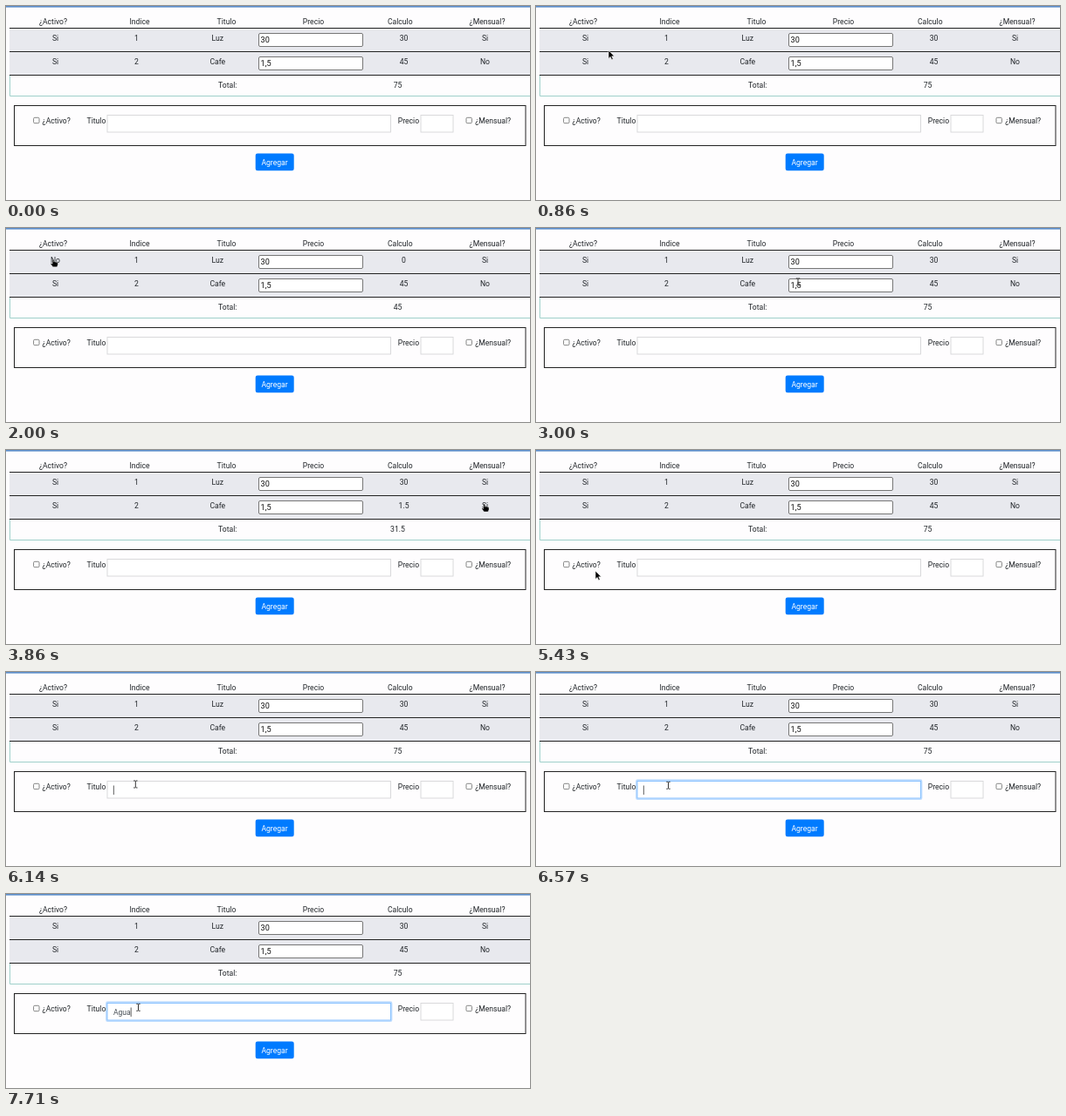
Write an HTML page that moves like this. It is 600 px wide and 223 px high and loops after 8000 ms.

```html
<!DOCTYPE html>
<html lang="es">
<head>
<meta charset="utf-8">
<title>Gastos</title>
<style>
  html, body { margin: 0; width: 100%; height: 100%; overflow: hidden; background: #fefdfe; }
  svg { display: block; width: 100%; height: 100%; }
  text { font: 8.6px Roboto, sans-serif; fill: #212529; }
  .mid { text-anchor: middle; }
  .field { font-size: 9.1px; fill: #111; }
</style>
</head>
<body>
<svg id="stage" viewBox="0 0 600 223">
  <rect width="600" height="1.6" fill="#5b8dcb"/>
  <rect x="4" y="25" width="596" height="55" fill="#e8e9ee"/>
  <path d="M4 25.5H600M4 52.5H600M4 79.5H600" stroke="#222" fill="none"/>
  <path d="M600 103.5H4.5V80" stroke="#9fd0ca" fill="none"/>
  <g fill="#fff" stroke="#767676">
    <rect x="289.5" y="31.5" width="119" height="15" rx="1.5"/>
    <rect x="289.5" y="58.5" width="119" height="15" rx="1.5"/>
  </g>
  <rect x="9.5" y="114.5" width="585.5" height="46" fill="none" stroke="#222"/>
  <g fill="#fff" stroke="#767676" stroke-width=".9">
    <rect x="31.6" y="128.3" width="6.4" height="6.4" rx="1.2"/>
    <rect x="527" y="128.3" width="6.4" height="6.4" rx="1.2"/>
  </g>
  <rect id="glow" x="115" y="124.2" width="326.5" height="22" rx="1.5" fill="none" stroke="#007bff" stroke-opacity=".25" stroke-width="1.8"/>
  <rect id="title" x="116" y="125.5" width="324.5" height="19.5" fill="#fff" stroke="#d6d6d8" stroke-width=".9"/>
  <rect x="475" y="125.5" width="37" height="19.5" fill="#fff" stroke="#d6d6d8" stroke-width=".9"/>
  <rect x="285.7" y="169.5" width="44" height="19.7" rx="2.3" fill="#007bff"/>
  <g id="labels"></g>
  <text id="typed" x="122.9" y="138.6" style="fill:#495057"></text>
  <path id="caret" d="M0 130.5V141" stroke="#333" stroke-width=".8"/>
  <g id="cursor">
    <path id="arrow" d="M0 0V9.4L2.2 7.4L3.7 10.8L5.3 10.1L3.8 6.8H6.8Z" fill="#000" stroke="#fff" stroke-width=".6"/>
    <path id="hand" d="M-.9 .4Q0 -.6 .8 .4V3Q1.7 2.3 2.4 3.1Q3.3 2.6 3.9 3.4Q5.3 3 5.4 4.6V6.3L4.4 8.7H-.2L-2.8 5.4Q-2.6 4.2 -1.6 4.7L-.9 5.3Z" fill="#000" stroke="#fff" stroke-width=".4"/>
    <path id="beam" d="M-2.2 -4H-.6L0 -3.5L.6 -4H2.2M0 -3.5V3.5M-2.2 4H-.6L0 3.5L.6 4H2.2" fill="none" stroke="#333" stroke-width="1"/>
  </g>
</svg>
<script>
const $ = id => document.getElementById(id);
const LOOP = 8000, RATE = 7 / 1000;

function label(str, x, y, cls = 'mid') {
  const el = document.createElementNS('http://www.w3.org/2000/svg', 'text');
  el.textContent = str;
  el.setAttribute('x', x);
  el.setAttribute('y', y);
  el.setAttribute('class', cls);
  return $('labels').appendChild(el);
}

const row = (words, xs, y) => words.map((w, i) => label(w, xs[i], y));
const columns = [56.5, 149.5, 242.3, 455.5, 548.5];
row(['¿Activo?', 'Indice', 'Titulo', 'Precio', 'Calculo', '¿Mensual?'],
    [54, 153, 252.5, 352, 451.3, 551], 21.3);
const light = row(['Si', '1', 'Luz', '30', 'Si'], columns, 39.8);
const coffee = row(['Si', '2', 'Cafe', '45', 'No'], columns, 67);
const [, total] = row(['Total:', '75'], [253.7, 448.5], 94);
label('30', 291.6, 42, 'field');
label('1,5', 291.6, 69, 'field');
label('¿Activo?', 41.6, 134.6, '');
label('Titulo', 92.6, 134.6, '');
label('Precio', 448.8, 134.6, '');
label('¿Mensual?', 537.2, 134.6, '');
label('Agregar', 307.5, 182.5).style.fill = '#fff';

// Pointer path: step, shape, x, y
const path = [
  [1, 'arrow', 323, 176], [3, 'arrow', 205, 115], [5, 'arrow', 105, 62],
  [6, 'arrow', 83, 51], [7, 'arrow', 62, 41], [8, 'hand', 54, 36],
  [18, 'hand', 54, 36], [19, 'arrow', 90, 41], [21, 'beam', 300, 62],
  [22, 'arrow', 420, 66], [23, 'arrow', 505, 66], [24, 'hand', 547.6, 62.2],
  [34, 'hand', 547.6, 62.2], [35, 'arrow', 470, 78], [36, 'arrow', 280, 112],
  [37, 'arrow', 120, 138], [38, 'arrow', 68, 139], [39, 'arrow', 52, 138],
  [42, 'arrow', 62, 136], [43, 'beam', 148.3, 129], [46, 'beam', 151.5, 130.3],
  [56, 'beam', 151.5, 130.3]
];

function movePointer(step) {
  const i = path.findLastIndex(p => p[0] <= step);
  $('cursor').style.display = i < 0 ? 'none' : '';
  if (i < 0) return;
  const [s, shape, x, y] = path[i], [s2, , x2, y2] = path[i + 1];
  const k = (step - s) / (s2 - s);
  $('cursor').setAttribute('transform', `translate(${x + (x2 - x) * k} ${y + (y2 - y) * k})`);
  for (const id of ['arrow', 'hand', 'beam']) $(id).style.display = id === shape ? '' : 'none';
}

function draw(step) {
  const active = step < 9 || step >= 18;
  const monthly = step >= 26 && step < 33;
  const a = active ? 30 : 0, b = monthly ? 1.5 : 45;
  light[0].textContent = active ? 'Si' : 'No';
  light[3].textContent = a;
  coffee[3].textContent = b;
  coffee[4].textContent = monthly ? 'Si' : 'No';
  total.textContent = a + b;

  const word = step < 51 ? '' : step < 53 ? 'A' : step < 54 ? 'Agu' : 'Agua';
  $('typed').textContent = word;
  const width = word ? $('typed').getComputedTextLength() : 0;
  $('caret').setAttribute('transform', `translate(${123.3 + width} 0)`);
  $('caret').style.display = (step >= 43 && step < 48) || step >= 53 ? '' : 'none';

  const focus = Math.min(1, Math.max(0, (step - 43) / 2));
  $('glow').style.opacity = focus;
  $('title').setAttribute('stroke', focus ? '#80bdff' : '#d6d6d8');
  movePointer(step);
}

const start = performance.now();
function tick() {
  const t = (performance.now() - start) % LOOP;
  draw(Math.min(55, Math.floor(t * RATE + 0.03)));
  requestAnimationFrame(tick);
}
tick();
</script>
</body>
</html>
```
